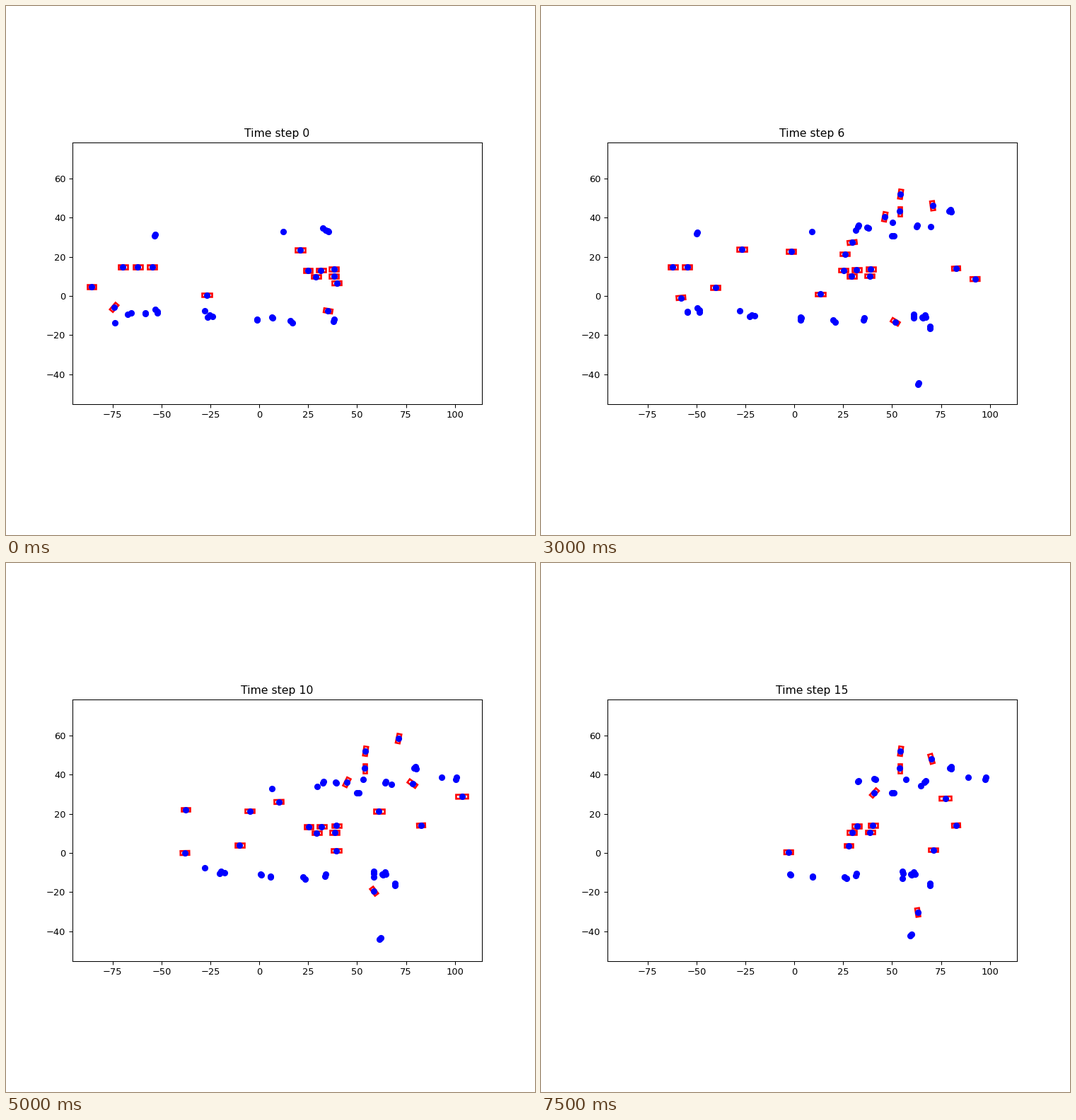
Recreate the animation shown at these times as a matplotlib script. Size 748 px wide and 748 px high, loop 8000 ms.

```python
import numpy as np
import matplotlib.pyplot as plt
from matplotlib.animation import FuncAnimation
from matplotlib.patches import Rectangle

STEPS = 16
SCALE = 2.766                      # pixels per unit
ORIGIN = np.array([358.2, 410.0])  # stage position of (0, 0)
FLIP = np.array([1, -1])
RANGE = 222                        # sensing radius around the ego car, pixels

fig, ax = plt.subplots(figsize=(8, 8), dpi=93.5)
ax.set_aspect("equal")
ax.set_xlim(-95.7, 113.9)
ax.set_ylim(-55.2, 78.6)
title = ax.set_title("Time step 0")
dots, = ax.plot([], [], "bo", zorder=2)

movers, boxes = [], []


def motion(p, v, a=(0, 0), at=0):
    """Stage position p at step `at`, moving with velocity v and curvature a."""
    p, v, a = np.array([p, v, a], float)
    return lambda n: p + v * (n - at) + a * (n - at) ** 2


def add(path, first, last, box=None, angle=None):
    movers.append((path, first, last, box, angle))


def car(p, v=(0, 0), a=(0, 0), at=0, first=0, last=STEPS, length=13, angle=None):
    box = Rectangle((0, 0), length / SCALE, 5.7 / SCALE, rotation_point="center",
                    fill=False, edgecolor="red", linewidth=2)
    boxes.append(ax.add_patch(box))
    path = motion(p, v, a, at)
    add(path, first, last, box, angle)
    return path


def walk(p, v=(0, 0), *offsets, first=0, last=STEPS):
    """A walker at p, joined by companions at the given offsets."""
    for off in ((0, 0), *offsets):
        add(motion(np.add(p, off), v), first, last)


# through traffic; the first car carries the sensor
ego = car((284, 408.5), (18.8, -0.2), (-0.05, 0), length=13.5, angle=0)
car((121, 397), (20.95, 0.17), length=12.5, angle=0)
car((416, 345), (-22, -0.2), length=13.5, angle=0)
car((503, 344), (-24.9, 0.45), length=12.5, angle=0)
car((557, 350.5), (-21.2, 0), first=5, last=12)
car((770.5, 345.5), (-24.3, 0.55), last=14, length=14.5, angle=0)
car((468, 392), (24.3, -1), angle=1)
car((791, 325), (-14.6, 0.53), length=17, angle=1)

# turning cars
car((153, 425.5), (5, -3), (0.54, 0.125), last=11, length=12.5) if False else None
car((455.5, 431), (9.2, 1.5), (-0.27, 0.18), length=12)
car((461, 331), (-9.5, 1.9), (-0.5, -0.13), at=4, first=4, last=12)
car((485.5, 301), (-0.8, 3), (-0.12, 0), at=7, first=5)
car((553, 274), (-0.4, -8.4), (0.37, -0.07), at=7, last=14)
car((597, 321), (-8.5, -1.6), (0.36, -0.49), at=7, length=13.5)


def merge(n):
    """A car easing into its lane while it speeds up."""
    return np.array([153 + 3.7 * n + 0.63 * n ** 2, 408.5 + 17.5 * np.exp(-n / 4)])


boxes.append(ax.add_patch(Rectangle(
    (0, 0), 12.5 / SCALE, 5.7 / SCALE, rotation_point="center",
    fill=False, edgecolor="red", linewidth=2)))
add(merge, 0, STEPS, boxes[-1])

# parked cars
for i in range(3):
    car((165.5 + 20.7 * i, 369), angle=0)
for x, y in ((438.5, 382.5), (445.5, 373.5), (464, 382)):
    car((x, y), (0.1, -0.1), angle=0)
car((427, 374), (0.1, -0.1), last=14, length=12.5, angle=0)
car((464, 372), (0.35, -0.07), angle=0)
car((587, 371), length=11.5, angle=3)
car((508.5, 266), angle=82)
car((507.5, 290), angle=90)

# walkers on the upper side
walk((210, 324.5), (1.6, -0.4), (1, -2))
walk((392, 319), (-1.55, 0), last=10)
walk((448, 314), (0, -0.35))
walk((452.5, 317), (-1.27, -0.1), last=12)
walk((455, 318), (1.08, -0.85), (1.5, 1))
walk((448, 312), (0.1, -0.3), first=2)
walk((496.5, 325), (0, 0), (3, 0), first=5)
walk((484, 306), (2.15, 0), first=5)
walk((523, 313), (1.3, -0.2), (1.3, -2), first=5)
walk((560, 310.5), (-1.5, 0.27), first=5)
walk((576.5, 290), (0.1, 0), (2, -2.5), (2.5, 0.5))
walk((639, 303), (-2.3, 0), first=9)
walk((649.8, 306), (-1.42, 0), (1, -2.7))

# walkers on the lower side
walk((153.5, 448), (-0.4, -0.6))
walk((172, 436), (-1.35, 0.3), (5, -2.5))
walk((197, 433.5), (1.65, -0.3), (0, 1.2))
walk((211, 428.5), (1.65, -0.2), (3.5, 3), (3.5, 5.5))
walk((281, 431), last=10)
walk((285.5, 440), (1.65, -0.1), (7, -1), last=12)
walk((288, 437.3), (1.65, -0.1))
walk((355.5, 442.5), (1.87, 0), (0, 1.5))
walk((376, 439.5), (-1.57, 0), (1, 1.8))
walk((402.5, 445), (1.77, -0.1), (3, 2.5))
walk((463, 445.5), (-1.17, -0.24), (0.7, -2.8))
walk((537, 436), (-1.72, 0), (0.5, 3))
walk((537, 438), (-1.74, 0.55))
walk((549, 439.5), (-1.7, 0), (1, 1.5), (3.8, -2.5), (5.2, 0))
walk((550, 456.5), (0, -0.05), (0, -3), first=4)
walk((540, 540.5), (-1.2, -0.9), (1.7, -2), first=5)


def draw(n):
    title.set_text(f"Time step {n}")
    spots = []
    for path, first, last, box, angle in movers:
        p = path(n)
        seen = first <= n <= last and np.hypot(*(p - ego(n))) < RANGE
        if seen:
            spots.append((p - ORIGIN) * FLIP / SCALE)
        if box:
            box.set_visible(seen)
        if seen and box:
            dx, dy = path(n + 0.1) - path(n - 0.1)
            box.set_xy(spots[-1] - np.array([box.get_width(), box.get_height()]) / 2)
            box.set_angle(np.degrees(np.arctan2(-dy, dx)) if angle is None else angle)
    dots.set_data(*np.transpose(spots))
    return [title, dots, *boxes]


anim = FuncAnimation(fig, draw, frames=STEPS, interval=500,
                     init_func=lambda: draw(0), repeat=True, repeat_delay=0)
plt.show()
```
